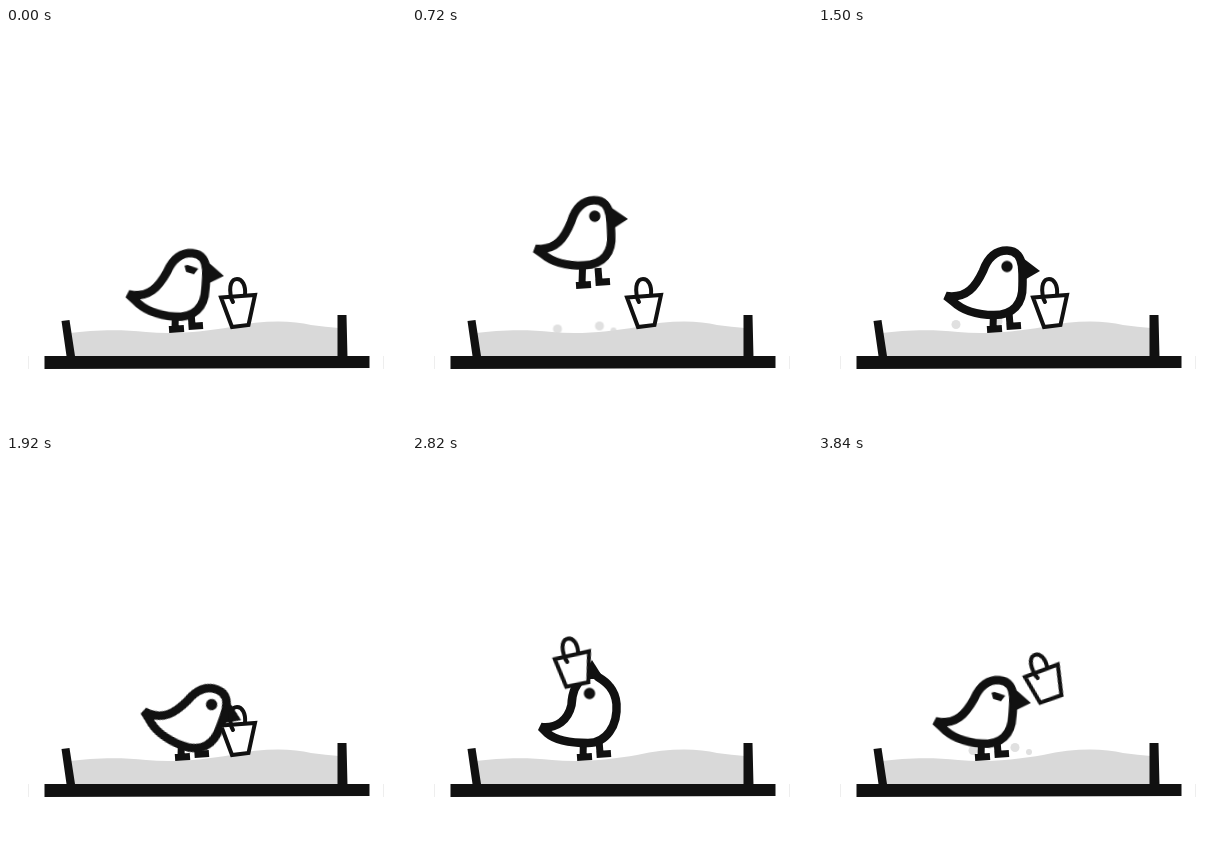
Write an HTML page without scripts that moves like this. It is 400 px wide and 400 px high and loops after 3.9 s.

```html
<!DOCTYPE html>
<html lang="en">
<head>
<meta charset="utf-8">
<title>Bird and bucket</title>
<style>
html, body { margin: 0; width: 100%; height: 100%; overflow: hidden; background: #fff; }
svg { display: block; width: 100%; height: 100%; }

.ink { fill: #111; }
.sand { fill: #d9d9d9; }
.line { fill: #fff; stroke: #111; }

/* 65 steps of 60 ms per loop */
.hop, .body, .outline, .beak, .eyes, .bucket, .pail, .dust { animation: 3.9s steps(2) infinite; }
.flip, .open, .frown { animation: 3.9s step-end infinite; }
.hop { animation-name: hop; }
.body { animation-name: tilt; transform-origin: 182px 300px; }
.outline { animation-name: outline; }
.beak { animation-name: beak; }
.eyes { animation-name: eyes; }
.bucket { animation-name: bucket; transform-origin: 233px 283px; }
.pail { animation-name: pail; }
.dust { animation-name: dust; }
.flip { animation-name: flip; }
.open { animation-name: open; }
.frown { animation-name: frown; }

@keyframes flip {
  0%, 33.846% { transform: none; }
  20% { transform: translate(345px, 0) scaleX(-1); }
}
@keyframes hop {
  0%, 3.076% { transform: translate(-6px, 0); }
  4.615% { transform: translate(-2px, -35px); }
  7.692% { transform: translate(4px, -78px); }
  10.769% { transform: translate(10px, -49px); }
  13.846% { transform: translate(6px, 0); }
  15.384% { transform: translate(3px, 0); }
  16.923% { transform: translate(-3px, -30px); }
  20% { transform: translate(-7px, -58px); }
  23.076% { transform: translate(-7px, -32px); }
  24.615%, 29.23% { transform: translate(-7px, 0); }
  30.769% { transform: translate(-7px, -30px); }
  33.846% { transform: translate(-7px, -57px); }
  36.923% { transform: translate(-2px, -25px); }
  38.461%, 61.538% { transform: translate(0, 0); }
  67.692%, 87.692% { transform: translate(-4px, 0); }
  92.307% { transform: translate(-10px, -6px); }
  93.846%, 100% { transform: translate(-12px, 0); }
}
@keyframes tilt {
  0% { transform: translate(-2px, 2px) rotate(4deg); }
  3.076% { transform: translate(-2px, 6px) rotate(5deg); }
  4.615%, 10.769% { transform: translate(2px, -6px) rotate(-3deg); }
  13.846%, 15.384% { transform: translate(0, 5px) rotate(4deg); }
  16.923%, 23.076% { transform: translate(2px, -6px) rotate(-3deg); }
  24.615%, 29.23% { transform: translate(0, 5px) rotate(5deg); }
  30.769%, 36.923% { transform: translate(2px, -5px) rotate(-3deg); }
  38.461%, 43.076% { transform: translate(0, 0) rotate(0deg); }
  46.153% { transform: translate(1px, 3px) rotate(10deg); }
  49.23% { transform: translate(-4px, 4px) rotate(20deg); }
  52.307% { transform: translate(-1px, 1px) rotate(7deg); }
  55.384%, 83.076% { transform: translate(0, 0) rotate(0deg); }
  84.615% { transform: translate(0, 4px) rotate(0deg); }
  87.692% { transform: translate(0, -2px) rotate(0deg); }
  92.307%, 100% { transform: translate(-1px, 1px) rotate(4deg); }
}
@keyframes outline {
  0%, 49.23%, 92.307%, 100% { d: path("M128 268C149 271 158 258 165 243C170 229 178 222.500 189 222.500C199 222.500 203 230 204 238C205 248 204.500 252 204.500 257C205 276 195 287 176 287C155 287 143 281 135 273.500Z"); }
  55.384%, 87.692% { d: path("M133 271C149 273 160 264 163.500 249C164 235 168 227 176 221C182 215 186 216 190 221C195 224 199 227 202 231C206 236 208 242 208.500 248C210 270 198 287 180 287C160 287 147 284 139 277Z"); }
}
@keyframes beak {
  0%, 49.23%, 92.307%, 100% { d: path("M201 227L222 243L203 254Z"); }
  55.384%, 87.692% { d: path("M173 223L184 204L196 223Z"); }
}
@keyframes eyes {
  0%, 49.23%, 92.307%, 100% { transform: translate(189px, 238.500px); }
  55.384%, 87.692% { transform: translate(181.500px, 237.500px); }
}
@keyframes open {
  0%, 89.23% { visibility: hidden; }
  3.076% { visibility: visible; }
}
@keyframes frown {
  0%, 89.23% { visibility: visible; }
  3.076% { visibility: hidden; }
}
@keyframes bucket {
  0%, 49.23% { transform: translate(0, 0) rotate(0deg); }
  52.307% { transform: translate(0, -25px) rotate(-20deg); }
  55.384% { transform: translate(-12px, -58px) rotate(-52deg); }
  58.461%, 61.538% { transform: translate(-24px, -72px) rotate(-73deg); }
  64.615% { transform: translate(-47px, -74px) rotate(-42deg); }
  67.692% { transform: translate(-68px, -69px) rotate(-4deg); }
  72.307%, 83.076% { transform: translate(-70.500px, -69px) rotate(-8deg); }
  84.615% { transform: translate(-70px, -65px) rotate(-10deg); }
  87.692% { transform: translate(-60px, -82px) rotate(-6deg); }
  92.307% { transform: translate(-38px, -96px) rotate(-8deg); }
  95.384% { transform: translate(-19px, -87px) rotate(-12deg); }
  96.923% { transform: translate(-11px, -73px) rotate(-14deg); }
  98.461%, 100% { transform: translate(-5px, -54px) rotate(-16deg); }
}
@keyframes pail {
  0%, 49.23% { d: path("M215 269.500L249 267L242.500 297L226 299Z"); }
  58.461%, 100% { d: path("M215 269.500L250 266.500L245 297L222.500 298.500Z"); }
}
@keyframes dust {
  0%, 3.076% { transform: translate(0, 18px); }
  7.692% { transform: translate(0, -7px); }
  10.769% { transform: translate(0, 0); }
  13.846%, 15.384% { transform: translate(-4px, 18px); }
  20% { transform: translate(-9px, -5px); }
  26.153% { transform: translate(-12px, 3px); }
  29.23% { transform: translate(-13px, 18px); }
  33.846% { transform: translate(-14px, -5px); }
  38.461% { transform: translate(-14px, 2px); }
  43.076%, 92.307% { transform: translate(3px, 18px); }
  95.384% { transform: translate(3px, 6px); }
  98.461%, 100% { transform: translate(3px, 0); }
}
</style>
</head>
<body>
<svg viewBox="0 0 400 400">
  <path d="M22.500 328V341M377.500 328V341" stroke="#eee"/>

  <g class="dust" fill="#e0e0e0">
    <circle cx="152" cy="294.500" r="4.500"/>
    <circle cx="194" cy="291.500" r="4.500"/>
    <circle cx="208" cy="296" r="3"/>
  </g>

  <!-- sandbox -->
  <path class="sand" d="M64 305C85 302 115 301 140 304C170 307 200 303 225 299C255 292 285 292 305 297Q320 299 333 300V330H66Z"/>
  <path class="ink" d="M55.500 293L63.500 292L69 328H363.500V340L38.500 341V328H60.500ZM331.500 287H340.500L341.500 330H331.500Z"/>

  <!-- bird -->
  <g class="flip">
    <g class="hop">
      <path d="M175.500 284L175 300M169 301.500L184 300.500M191 284L192 297M188.500 298.500L203 297.500" fill="none" stroke="#111" stroke-width="7"/>
      <g class="body">
        <path class="outline line" stroke-width="8.500" stroke-linejoin="bevel" d="M128 268C149 271 158 258 165 243C170 229 178 222.500 189 222.500C199 222.500 203 230 204 238C205 248 204.500 252 204.500 257C205 276 195 287 176 287C155 287 143 281 135 273.500Z"/>
        <path class="beak ink" d="M201 227L222 243L203 254Z"/>
        <g class="eyes ink">
          <circle class="open" r="5.700"/>
          <path class="frown" d="M-7 -3L-4 -4L7 -1L3 5L-5 3Z"/>
        </g>
      </g>
    </g>
  </g>

  <g class="bucket line" stroke-width="4" stroke-linejoin="miter" stroke-linecap="round">
    <path class="pail" d="M215 269.500L249 267L242.500 297L226 299Z"/>
    <path fill="none" d="M227 274L225.500 271C222 257 226 251 231 251C236 251 240 257 239 267"/>
  </g>
</svg>
</body>
</html>
```
